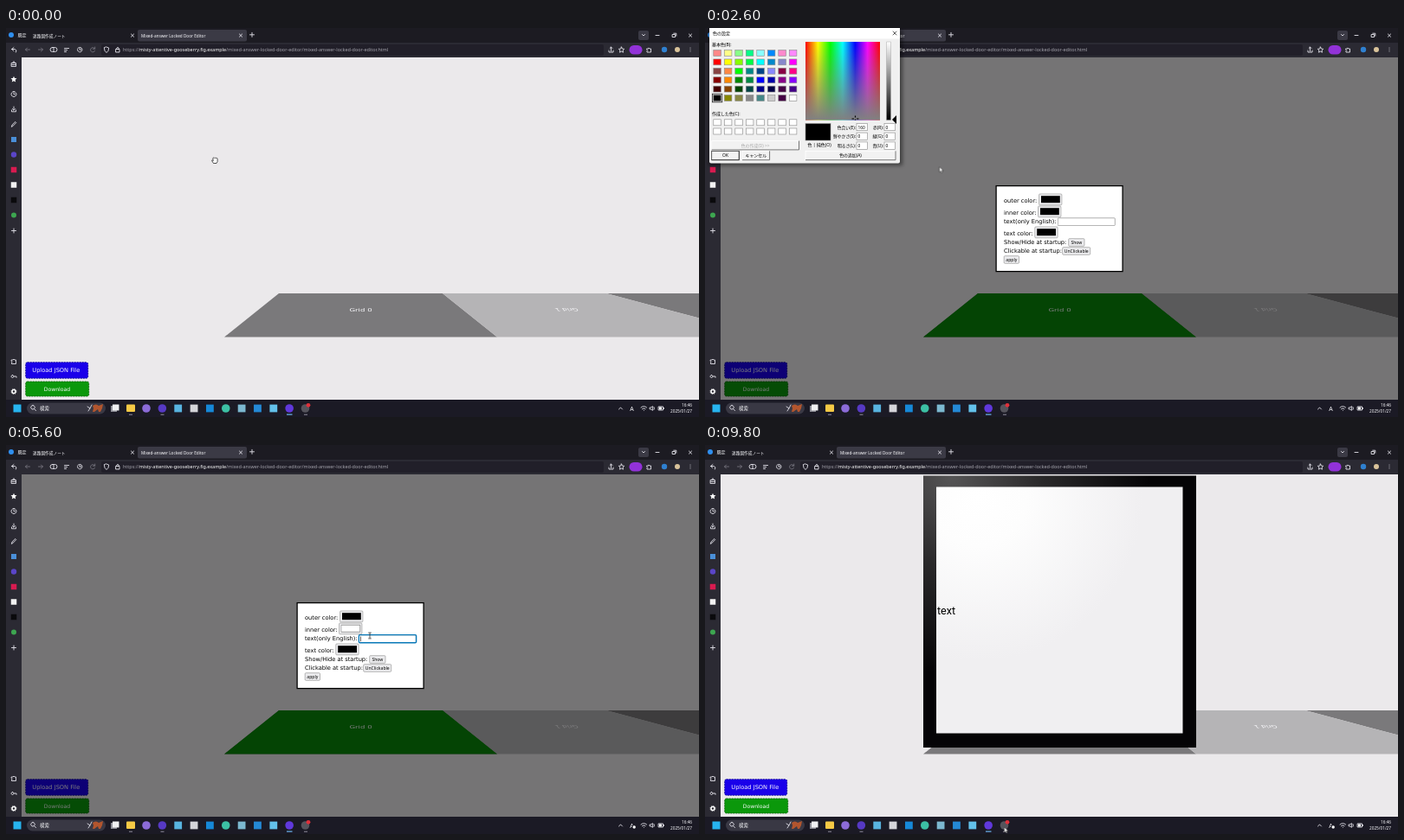
These frames come from a looping animation (800 by 450 pixels, 9900 ms). An HTML page:

```html
<!DOCTYPE html>
<html lang="en">
<head>
<meta charset="utf-8">
<title>Locked door editor</title>
<style>
html, body { margin: 0; width: 100%; height: 100%; overflow: hidden; background: #1c1b22; }
svg { display: block; width: 800px; height: 450px; }
text { font: 5px "Noto Sans", "Noto Sans CJK JP", "Noto Sans CJK", sans-serif; fill: #fbfbfe; white-space: pre; }
.dark text { fill: #000; }
text.page { font-family: "DejaVu Sans", sans-serif; font-size: 6.65px; }
text.url { font-size: 5.45px; }
text.mid { text-anchor: middle; }
text.end { text-anchor: end; }
.line { fill: none; stroke: #e4e3ea; stroke-width: .9; stroke-linecap: round; stroke-linejoin: round; }
.dim { stroke: #74737d; }

/* Timed states, all on one 9.9 s clock */
.hover, .modal, .press, .picker, .pre, .post, .focus, .ime, .k1, .k2, .k3, .k4,
.cube, .hand, .arrow, .beam { opacity: 0; animation: 9.9s step-end infinite; }
.hover { animation-name: hover; }
.modal { animation-name: modal; }
.press { animation-name: press; }
.picker { animation-name: picker; }
.pre { animation-name: pre; }
.post { animation-name: post; }
.focus { animation-name: focus; }
.ime { animation-name: ime; }
.k1 { animation-name: k1; }
.k2 { animation-name: k2; }
.k3 { animation-name: k3; }
.k4 { animation-name: k4; }
.cube { animation-name: cube; }
.hand { animation-name: hand; }
.arrow { animation-name: arrow; }
.beam { animation-name: beam; }
@keyframes hover { 0%, 91.91% { opacity: 0 } 6.06% { opacity: 1 } }
@keyframes modal { 0%, 91.91% { opacity: 0 } 9.09% { opacity: 1 } }
@keyframes press { 0%, 21.21% { opacity: 0 } 16.16% { opacity: 1 } }
@keyframes picker { 0%, 47.47% { opacity: 0 } 21.21% { opacity: 1 } }
@keyframes pre { 0% { opacity: 1 } 37.37% { opacity: 0 } }
@keyframes post { 0% { opacity: 0 } 37.37% { opacity: 1 } }
@keyframes focus { 0%, 87.87% { opacity: 0 } 54.54% { opacity: 1 } }
@keyframes ime { 0% { opacity: 0 } 54.54% { opacity: 1 } }
@keyframes k1 { 0%, 66.66% { opacity: 0 } 63.63% { opacity: 1 } }
@keyframes k2 { 0%, 69.69% { opacity: 0 } 66.66% { opacity: 1 } }
@keyframes k3 { 0%, 72.72% { opacity: 0 } 69.69% { opacity: 1 } }
@keyframes k4 { 0% { opacity: 0 } 72.72% { opacity: 1 } }
@keyframes cube { 0% { opacity: 0 } 91.91% { opacity: 1 } }
@keyframes hand { 0% { opacity: 1 } 9.09% { opacity: 0 } }
@keyframes arrow { 0%, 53.53% { opacity: 0 } 9.09%, 79.79% { opacity: 1 } }
@keyframes beam { 0%, 79.79% { opacity: 0 } 53.53% { opacity: 1 } }

.caret { animation: caret 9.9s step-end infinite; }
@keyframes caret {
  0% { transform: none }
  63.63% { transform: translateX(2px) }
  66.66% { transform: translateX(4.8px) }
  69.69% { transform: translateX(7.5px) }
  72.72% { transform: translateX(9.3px) }
}
.cursor { animation: roam 9.9s ease-in-out infinite; }
@keyframes roam {
  0%, 1% { transform: translate(241px, 153px) }
  7% { transform: translate(400px, 328px) }
  9.09% { transform: translate(402px, 329px) }
  17.5%, 21.5% { transform: translate(404px, 215px) }
  32% { transform: translate(88px, 86px) }
  34.34% { transform: translate(83px, 81px) }
  37%, 39% { transform: translate(101px, 80px) }
  44.5%, 47.6% { transform: translate(33.5px, 146.5px) }
  54.5%, 57% { transform: translate(420px, 220.5px) }
  61%, 78% { transform: translate(428px, 225px) }
  82.5%, 83.2% { transform: translate(480.5px, 266px) }
  89.5%, 92% { transform: translate(353px, 267px) }
  98.5%, 100% { transform: translate(345.5px, 442px) }
}
</style>
</head>
<body>
<svg viewBox="0 0 800 450" xmlns="http://www.w3.org/2000/svg">
  <defs>
    <linearGradient id="hues">
      <stop offset="0" stop-color="#f00"/><stop offset=".167" stop-color="#ff0"/>
      <stop offset=".333" stop-color="#0f0"/><stop offset=".5" stop-color="#0ff"/>
      <stop offset=".667" stop-color="#00f"/><stop offset=".833" stop-color="#f0f"/>
      <stop offset="1" stop-color="#f00"/>
    </linearGradient>
    <linearGradient id="fade" x2="0" y2="1">
      <stop offset="0" stop-color="#808080" stop-opacity="0"/><stop offset="1" stop-color="#808080"/>
    </linearGradient>
    <linearGradient id="lum" x2="0" y2="1"><stop offset="0" stop-color="#fff"/><stop offset="1"/></linearGradient>
    <radialGradient id="frame" gradientUnits="userSpaceOnUse" cx="285" cy="35" r="230">
      <stop offset="0" stop-color="#565556"/><stop offset=".45" stop-color="#2a292a"/><stop offset="1" stop-color="#050406"/>
    </radialGradient>
    <radialGradient id="panel" gradientUnits="userSpaceOnUse" cx="315" cy="60" r="190">
      <stop offset="0" stop-color="#fff"/><stop offset=".3" stop-color="#fdfdfd"/><stop offset="1" stop-color="#f0eff1"/>
    </radialGradient>
    <filter id="soft"><feGaussianBlur stdDeviation="2"/></filter>
    <clipPath id="view"><path d="M18 34H800V430H18z"/></clipPath>
  </defs>

  <!-- Web page -->
  <g clip-path="url(#view)">
    <path fill="#ebe9eb" d="M18 34H800V430H18z"/>
    <path fill="#7a797b" d="M315 307H504L567 357.5H252zM693 307H882V357.5z"/>
    <path fill="#b5b4b6" d="M504 307H693L882 357.5H567z"/>
    <path class="hover" fill="#088808" d="M315 307H504L567 357.5H252z"/>
    <text class="page mid" transform="translate(409.5 328.3) scale(1 .62)" style="font-size:8.6px">Grid 0</text>
    <text class="page mid" transform="translate(646 324.3) skewX(38) scale(-1 -.55)" style="font-size:8.6px">Grid 1</text>
    <g class="cube">
      <path fill="url(#frame)" d="M252 35.5H567V350H252z"/>
      <path fill="url(#panel)" d="M267 48.5H551.5V333.5H267z"/>
      <text x="268" y="196" style="font:12.6px Roboto,sans-serif;fill:#000">text</text>
    </g>
    <rect x="22.7" y="386.7" width="72" height="18.5" rx="2" fill="#1a00ea" stroke="#0c0090" stroke-width=".8" stroke-dasharray="2 1"/>
    <text class="page" x="30.3" y="398.2">Upload JSON File</text>
    <rect x="22.7" y="409" width="73" height="17" rx="2" fill="#0b980b" stroke="#056005" stroke-width=".8" stroke-dasharray="2 1"/>
    <text class="page mid" x="59" y="420" style="font-size:6.1px">Download</text>

    <g class="modal dark">
      <path fill-opacity=".5" d="M18 34H800V430H18z"/>
      <rect x="336.1" y="182.6" width="146" height="99" fill="#fff" stroke="#000" stroke-width="1.3"/>
      <g id="form"></g>
      <rect class="press" x="384.6" y="206" width="26.5" height="12.7" rx="1" fill="none" stroke="#555" stroke-width="1.2"/>
      <path class="post" fill="#fff" stroke="#777" stroke-width=".5" d="M387 208.2H408.8V216.2H387z"/>
      <rect x="407.3" y="219.8" width="66" height="8.8" rx=".8" fill="#fff" stroke="#777" stroke-width=".6"/>
      <g class="focus">
        <rect x="407.4" y="219.6" width="66.2" height="9.2" rx="1.2" fill="none" stroke="#0878b8" stroke-width="1.4"/>
        <path class="caret" d="M409.2 221.4h.6v5.8h-.6z"/>
      </g>
      <g id="typed"></g>
    </g>
  </g>

  <!-- Browser frame -->
  <path fill="#1c1b22" d="M0 0H800V17H0z"/>
  <path fill="#2b2a33" d="M0 17H800V34H18V430H0z"/>
  <rect x="152" y="2" width="126" height="13.5" rx="2" fill="#3b3a45"/>
  <rect x="110" y="19" width="580" height="13" rx="2" fill="#211f29"/>
  <rect x="730" y="3" width="12" height="11" rx="2" fill="#3b3a45"/>
  <text x="13.5" y="10">既定</text>
  <text x="31" y="10.5" style="font-size:4.7px">迷路図作成ノート</text>
  <text x="156" y="10.5" style="font-size:4.7px">Mixed-answer Locked Door Editor</text>
  <text class="url" x="135" y="27.4" style="fill:#a5a4ad">https://<tspan fill="#fff">misty-attentive-gooseberry.fig.example</tspan>/mixed-answer-locked-door-editor/mixed-answer-locked-door-editor.html</text>
  <g id="lines"></g>

  <!-- Taskbar -->
  <path fill="#1b1a25" d="M0 430H800V450H0z"/>
  <rect x="24" y="433.5" width="91" height="13" rx="6.5" fill="#393844"/>
  <text x="39" y="442.2" style="font-size:5.4px">検索</text>
  <path fill="#b2552e" d="M100 437q4-3 7 0l5-2-1 5-2 4h-2l-1-3-4 3h-2l1-4z"/>
  <path class="line" stroke-width=".5" d="M94 438l3 2-2 3M99 436l-2 4"/>
  <path fill="#6cb6f2" d="M324 446.5h6.500v1.200h-6.500z"/>
  <path fill="#8d8b99" d="M142 446.700h4v1h-4zM178.500 446.700h4v1h-4zM344 446.700h4v1h-4z"/>
  <text x="720.3" y="442.6" style="font-size:7px">A</text>
  <g class="ime"><circle cx="725.2" cy="442" r="2.6" fill="#1b1a25"/><circle cx="725.2" cy="442" r="1.7" fill="#fff"/></g>
  <text class="end" x="792" y="438.3" style="font-size:4.7px">16:46</text>
  <text class="end" x="792" y="445.4" style="font-size:4.7px">2025/01/27</text>
  <g id="icons"></g>

  <!-- Colour dialog -->
  <g class="picker dark">
    <path d="M4 2H228V159H4z" fill-opacity=".45" filter="url(#soft)"/>
    <rect x="5" y="-3" width="220" height="159.500" rx="2" fill="#f0f0f0"/>
    <path fill="#fff" d="M5 0H225V12.500H5z"/>
    <text x="9" y="8.300">色の設定</text>
    <path class="line" style="stroke:#222;stroke-width:.7" d="M217 4l4 4m0-4l-4 4"/>
    <text x="8" y="21.300">基本色(B):</text>
    <text x="8" y="101">作成した色(C):</text>
    <path fill="url(#hues)" d="M116 16H202V106.500H116z"/>
    <path fill="url(#fade)" d="M116 16H202V106.500H116z"/>
    <path fill="url(#lum)" stroke="#999" stroke-width=".4" d="M209.500 16H214.500V106.500H209.500z"/>
    <path d="M173.500 101.500v2m0 2v1m-4-1.500h2.500m3 0h2.500" stroke="#000" stroke-width="1.200"/>
    <g id="dialog"></g>
  </g>

  <g class="cursor">
    <g class="hand"><path fill="#fff" stroke="#111" stroke-width=".7" d="M-1.500 3.500L-3.200 .8q-.5-1.300.8-.8l.6.600-.4-3q.8-1 1.300 0 .6-1.200 1.400-.2 1-.8 1.400.3 1.200-.3 1.200.8V1.500L2 3.500z"/></g>
    <g class="arrow"><path fill="#fff" stroke="#222" stroke-width=".5" d="M0 0V6.200L1.400 4.900 2.400 7.100 3.400 6.600 2.500 4.500H4.400z"/></g>
    <g class="beam"><path class="line" style="stroke:#222;stroke-width:.7" d="M-1.500-3.200h3M0-3.200V3.200M-1.500 3.200h3"/></g>
  </g>
</svg>
<script>
const NS = 'http://www.w3.org/2000/svg';
const $ = id => document.getElementById(id);
function add(parent, tag, attrs, content) {
  const el = document.createElementNS(NS, tag);
  for (const k in attrs) el.setAttribute(k, attrs[k]);
  if (content !== undefined) el.textContent = content;
  return parent.appendChild(el);
}
const box = (g, x, y, width, height, fill, extra) => add(g, 'rect', { x, y, width, height, fill, ...extra });
const label = (g, x, y, str, cls = '', size) =>
  add(g, 'text', { x, y, class: cls, ...(size && { style: `font-size:${size}px` }) }, str);
const line = (d, cls = '') => add($('lines'), 'path', { d, class: 'line ' + cls });
const dot = (cx, cy, r, fill) => add($('icons'), 'circle', { cx, cy, r, fill });
const tile = (cx, cy, s, fill) => box($('icons'), cx - s / 2, cy - s / 2, s, s, fill);

// Form inside the modal
const form = $('form');
const edge = { stroke: '#8a8a8a', 'stroke-width': .6, rx: 1 };
[['outer color:', 202, 385.6, 192], ['inner color:', 216, 384.6, 206], ['text color:', 239.8, 380.8, 230]]
  .forEach(([name, y, x, top]) => {
    label(form, 345, y, name, 'page');
    box(form, x, top, 26.3, 12.8, '#ececee', edge);
    box(form, x + 2.4, top + 2.2, 21.8, 8, '#000');
  });
label(form, 345, 226, 'text(only English):', 'page');
label(form, 345, 250, 'Show/Hide at startup:', 'page');
label(form, 345, 260.2, 'Clickable at startup:', 'page');
[['Show', 419.7, 243.7, 18.3], ['UnClickable', 412.7, 253.7, 32], ['apply', 345.2, 263.7, 17.3]]
  .forEach(([name, x, y, w]) => {
    box(form, x, y, w, 8.6, '#ececee', edge);
    label(form, x + w / 2, y + 6.1, name, 'mid', 5.1);
  });
for (let n = 1; n < 5; n++) label($('typed'), 409, 226, 'text'.slice(0, n), 'k' + n, 5.2);

// Colour dialog
const dlg = $('dialog');
const sunken = { stroke: '#888', 'stroke-width': .6 };
const rows = ['f88 ff8 8f8 0f8 8ff 08f f8c f8f', 'f00 ff0 8f0 0f4 0ff 08c 88c f0f',
  '844 f84 0f0 088 048 88f 804 f08', '800 f80 080 084 00f 00a 808 80f',
  '400 840 040 044 008 004 404 408', '000 880 884 888 488 ccc 404 fff'];
rows.forEach((row, j) => row.split(' ').forEach((c, i) =>
  box(dlg, 9.8 + i * 12.5, 25.6 + j * 10.4, 8.6, 6.8, '#' + c, sunken)));
for (let i = 0; i < 16; i++)
  box(dlg, 9.8 + i % 8 * 12.5, 105.8 + (i >> 3) * 10.2, 8.6, 7, '#fff', sunken);
const states = [['pre', '#000', 106, 9.8, [160, 0, 0], 0], ['post', '#fff', 17, 97.3, [160, 0, 240], 255]];
const names = ['色合い(E):', '鮮やかさ(S):', '明るさ(L):', '赤(R):', '緑(G):', '青(U):'];
const field = i => [i < 3 ? 175 : 207, 110.3 + i % 3 * 10.8];
names.forEach((name, i) => {
  const [x, y] = field(i);
  label(dlg, x - 1, y + 6.2, name, 'end', 4.8);
  box(dlg, x, y, 12.5, 8.4, '#fff', sunken);
});
for (const [cls, fill, mark, pick, hsl, rgb] of states) {
  const g = add(dlg, 'g', { class: cls });
  box(g, 116, 110.5, 29, 19.5, fill, sunken);
  box(g, pick - 1.4, 76.2, 11.4, 9.6, 'none', { stroke: '#222', 'stroke-width': .8 });
  add(g, 'path', { d: `M216 ${mark}l5-5v10z` });
  names.forEach((_, i) => {
    const [x, y] = field(i);
    label(g, x + 1.5, y + 6.2, i < 3 ? hsl[i] : rgb, '', 4.8);
  });
}
label(dlg, 118.5, 137.4, '色 | 純色(O)');
[['色の作成(D) >>', 7.7, 130.5, 100.8, '#aaa'], ['OK', 7.7, 142.3, 31.6], ['キャンセル', 43, 142.3, 31.6], ['色の追加(A)', 116, 142.3, 104]]
  .forEach(([name, x, y, w, tone]) => {
    box(dlg, x, y, w, 10.4, '#f2f2f2', { stroke: '#fff', 'stroke-width': .8 });
    add(dlg, 'path', { d: `M${x} ${y + 10.4}h${w}v-10.4`, fill: 'none', stroke: '#666', 'stroke-width': .9 });
    const t = label(dlg, x + w / 2, y + 7, name, 'mid', 4.9);
    if (tone) t.style.fill = tone;
  });
box(dlg, 7.7, 142.3, 31.6, 10.4, 'none', { stroke: '#333', 'stroke-width': .8 });

// Tab strip and toolbar
for (const x of [146, 271, 790]) line(`M${x - 1.6} 7l3.200 3.200m0-3.200l-3.200 3.200`);
line('M281.500 7.800h5M284 5.300v5M734.500 7.500l1.500 1.500 1.500-1.500M750 8.500h4M769.500 7.500h3v3h-3zM770.800 6.200h3v3');
line('M9 22.500l-2.500 2 2.500 2M6.500 24.500h4q2.500 1 1 3.500');
line('M27.500 25h-5m2-2l-2 2 2 2M37.500 25h5m-2-2l2 2-2 2', 'dim');
line('M53.500 22.500h3a2.500 2.500 0 0 1 0 5h-3a2.500 2.500 0 0 1 0-5zM55 22.500v5M67.500 23.500h5m-5 2h3m-3 2h2M82.500 25a2.700 2.700 0 1 0 1-2l-1 1M85 23.500v1.700h1.500');
line('M102.500 24a2.600 2.600 0 1 0 0 2.500M102.700 22v2.200h-2.200', 'dim');
line('M116 22l2.700 1q0 4-2.700 5.500-2.700-1.500-2.700-5.500zM127 24.500h4v3.500h-4zM127.800 24.500v-1.300q1.200-1.800 2.400 0v1.300');
line('M698.500 27v-5l-1.500 1.500m1.500-1.500l1.500 1.500M696 26v2h5v-2M710.500 22l1 2 2.200.3-1.600 1.600.4 2.300-2-1.100-2 1.100.4-2.300-1.600-1.600 2.200-.3z');
line('M740 24h1.500q0-2 1.500 0h1.500v4h-4.500v-1.500q1.500-.7 0-1.300zM790 23v0M790 25v0M790 27v0');

// Sidebar
line('M6.500 40.500h5v4h-5zM7.500 40.500l1.500-2 1.500 2M6.500 42.500h5M9 73.500a3 3 0 1 0 .01 0zM9 75v1.700h1.300');
line('M9 91v4m-1.700-1.500l1.700 1.700 1.700-1.700M6.500 95v1.800h5v-1.800M6.500 114l.6-2 3.700-3.500 1 1-3.700 3.700zM6.500 234.500h5m-2.500-2.500v5');
line('M6.500 384h1.500q1-2 2 0h1.500v4.500h-5v-1.500q1.500-.7 0-1.500zM7.500 401.500a1.500 1.500 0 1 0 .01 0zM9 403h3v1.300');
add($('lines'), 'path', { fill: '#fff', d: 'M9 55.700l1 2.300 2.500.3-1.900 1.700.6 2.500-2.200-1.300-2.200 1.300.6-2.500-1.900-1.700 2.500-.3z' });
add($('lines'), 'circle', { cx: 9, cy: 420.5, r: 2, fill: 'none', stroke: '#fff', 'stroke-width': 1.5 });
add($('lines'), 'circle', { cx: 9, cy: 420.5, r: 3, fill: 'none', stroke: '#fff', 'stroke-width': .8, 'stroke-dasharray': '1.2 1.156' });

// Plain app marks
dot(6, 8, 3, '#2f8fee');
tile(9, 129, 6, '#4a8fd8');
dot(9, 146.500, 3.200, '#5a45c8');
tile(9, 164, 6.500, '#d81b50');
tile(9, 181.500, 6.500, '#f2f2f2');
tile(9, 199, 6.500, '#0a0a0c');
dot(9, 216.500, 3, '#3da650');
box($('icons'), 719.5, 20, 15, 10.500, '#9232d8', { rx: 5.2 });
dot(760, 25, 3.200, '#2f80d0');
dot(775, 25, 3, '#d9c39a');

// Taskbar marks and tray
tile(13, 440, 9, '#27b4ef');
box($('icons'), 121, 437, 7, 7, '#8f8f98');
box($('icons'), 123, 435.500, 7.500, 7, '#f0f0f2');
box($('icons'), 139, 435.500, 10, 8.500, '#f5c945', { rx: 1 });
const marks = [['c', '#8c6bd8'], ['c', '#5639c4'], ['s', '#58b4e0'], ['s', '#d5d5da'], ['s', '#1688d8'],
  ['c', '#3cc0a4'], ['s', '#7cb8d0'], ['s', '#2489d6'], ['s', '#63c1ea'], ['c', '#6038dc']];
marks.forEach(([kind, fill], i) => {
  const x = 162 + i * 18.35;
  kind === 'c' ? dot(x, 440, 4.800, fill) : tile(x, 440, 8.800, fill);
});
dot(345.5, 440, 4.8, '#55545c');
dot(349, 436.3, 2.4, '#e0303a');
const tray = d => add($('icons'), 'path', { d, class: 'line' });
tray('M31 436.500a2.300 2.300 0 1 0 .01 0zM32.700 440.800l1.800 1.800');
tray('M707.500 441l2-2 2 2M733 439q3.300-2.800 6.600 0M734.500 440.700q1.800-1.500 3.600 0M736.300 442.500v0');
tray('M743.500 439h1.300l1.500-1.500v5l-1.500-1.500h-1.300zM748 438.500q1 1.500 0 3M753.500 438h5v4h-5zM759.500 439.500v1');
add($('icons'), 'path', { d: 'M754 438.500h3v3h-3z', fill: '#fff' });
</script>
</body>
</html>
```
